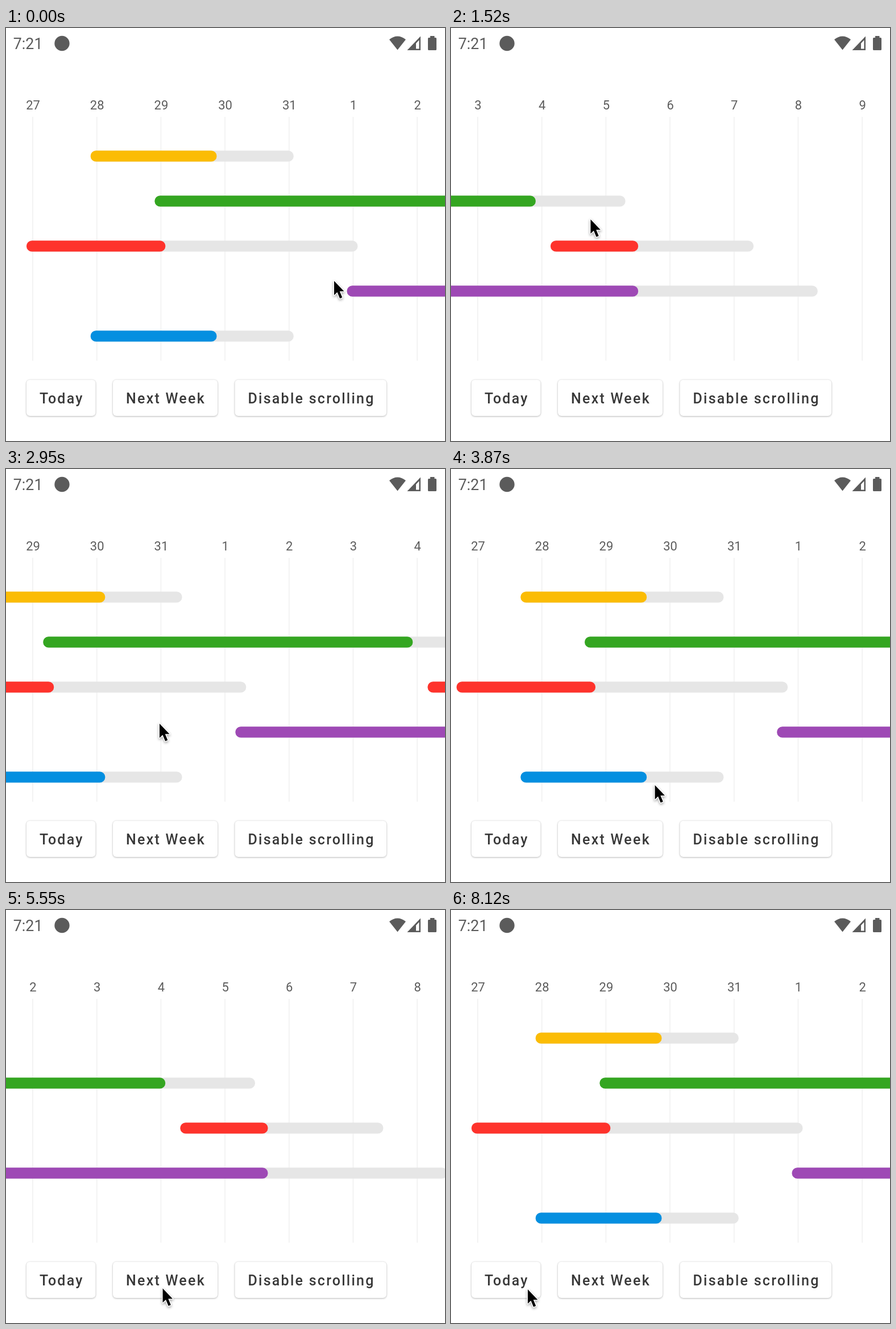
Recreate the animation shown at these times as an HTML page. Size 772 by 725 pixels, loop 8170 ms.

```html
<!DOCTYPE html>
<html lang="en">
<head>
<meta charset="utf-8">
<title>Scrolling timeline</title>
<style>
html, body { margin: 0; width: 100%; height: 100%; overflow: hidden; background: #fff; }
svg { display: block; width: 772px; height: 725px; font-family: Roboto, sans-serif; }
#days text { font-size: 22px; fill: #5c5c5c; text-anchor: middle; }
#buttons text { font-size: 25px; font-weight: 500; letter-spacing: .0893em; fill: #393939; }
#buttons rect { fill: #fff; }
#status { fill: #5b5b5b; }
#cursor { stroke: #fff; stroke-width: 3; paint-order: stroke; stroke-linejoin: round;
  filter: drop-shadow(0 2px 2px rgba(0,0,0,.35)); }
</style>
</head>
<body>
<svg viewBox="0 0 772 725">
  <g id="status">
    <text x="12.8" y="37" font-size="26.8">7:21</text>
    <circle cx="98.5" cy="27" r="13.2"/>
    <path d="M688.5 38.5L674 20.3Q688.5 8.5 703 20.3Z"/>
    <path fill-rule="evenodd" d="M705.5 39L729 14.5V39ZM721 27V36.5H726.5V21.2Z"/>
    <path d="M746 14h7.5v3h2q1.5 0 1.5 1.5v19q0 1.5-1.5 1.5h-12q-1.5 0-1.5-1.5v-19q0-1.5 1.5-1.5h2.5z"/>
  </g>
  <g id="days"></g>
  <g id="bars"></g>
  <g id="buttons"></g>
  <path id="cursor" d="M0 0V25l5.5-5.3 4.6 11 4.2-1.8-4.5-10.7h7.7z"/>
</svg>
<script>
const LOOP = 8170, DAY = 112.7;
const $ = id => document.getElementById(id);

function add(parent, tag, attrs, text = '') {
  const el = document.createElementNS('http://www.w3.org/2000/svg', tag);
  for (const k in attrs) el.setAttribute(k, attrs[k]);
  el.textContent = text;
  return parent.appendChild(el);
}

// 0 to 1 over the given span, smooth at both ends
function ease(t, start, length) {
  const u = Math.min(1, Math.max(0, (t - start) / length));
  return u * u * (3 - 2 * u);
}

// Scroll gestures: start, duration, distance
const swipes = [
  [300, 500, 469], [1050, 550, 311], [1963, 400, -270], [2574, 500, -370], [3550, 450, -142],
  [5230, 450, 791], [6483, 260, -789]
];
const scrollAt = t => swipes.reduce((sum, [start, length, by]) => sum + by * ease(t, start, length), 0);

// Cursor stops: time, x, y
const stops = [
  [0, 577, 444], [300, 700, 615], [700, 400, 410], [920, 481, 399], [1100, 600, 420],
  [1600, 220, 330], [1963, 160, 300], [2363, 400, 323], [2600, 180, 430], [2800, 360, 440],
  [2950, 270, 447], [3500, 200, 480], [4000, 390, 570], [4450, 307, 664], [5450, 307, 664],
  [5820, 135, 666]
];
function cursorAt(t) {
  let [, x, y] = stops[0];
  for (let i = 1; i < stops.length; i++) {
    const [from, x0, y0] = stops[i - 1], [to, x1, y1] = stops[i];
    const p = ease(t, from, to - from);
    x += (x1 - x0) * p;
    y += (y1 - y0) * p;
  }
  return `${x} ${y}`;
}

const labels = [];
for (let i = 0; i < 7; i++) {
  const x = 47 + i * DAY;
  add($('days'), 'path', { d: `M${x} 156V584`, stroke: '#f3f3f3', 'stroke-width': 2 });
  labels.push(add($('days'), 'text', { x: x + .5, y: 143.3 }));
}

// row, start day, length in days, progress, colour
const bars = [
  [0, 1, 3, .6, '#fbbc05'],
  [1, 2, 7, .8, '#34a621'],
  [2, 0, 5, .4, '#fe332c'],
  [2, 8, 3, .4, '#fe332c'],
  [3, 5, 7, .6, '#9e49b5'],
  [4, 1, 3, .6, '#048fe0']
];
for (const [row, start, days, done, color] of bars) {
  const box = { x: 36 + start * DAY, y: 215.2 + row * 79, height: 19.3, rx: 9.6 };
  add($('bars'), 'rect', { ...box, width: days * DAY + 19, fill: '#e6e6e6' });
  add($('bars'), 'rect', { ...box, width: days * DAY * done + 19, fill: color });
}

// label, left edge, width, press time
const buttons = [
  ['Today', 36, 121.5, 6430],
  ['Next Week', 188, 184, 5060],
  ['Disable scrolling', 402.5, 266.5, Infinity]
].map(([label, x, width, press]) => {
  const el = add($('buttons'), 'rect', { x, y: 617.5, width, height: 63.5, rx: 6 });
  add($('buttons'), 'text', { x: x + 23, y: 659 }, label);
  return { el, press };
});

function draw(t) {
  const scroll = scrollAt(t), first = Math.floor(scroll / DAY + .7);
  $('bars').setAttribute('transform', `translate(${-scroll} 0)`);
  labels.forEach((el, i) => el.textContent = (26 + first + i) % 31 + 1);
  for (const { el, press } of buttons) {
    const lift = ease(t, press, 80) - ease(t, press + 170, 150);
    el.style.filter = 'drop-shadow(0 0 1px rgba(0,0,0,.12)) '
      + `drop-shadow(0 ${1.5 + 4.5 * lift}px ${1.5 + 5 * lift}px rgba(0,0,0,.24))`;
  }
  $('cursor').setAttribute('transform', `translate(${cursorAt(t)})`);
}

const began = performance.now();
function tick() {
  draw((performance.now() - began) % LOOP);
  requestAnimationFrame(tick);
}
tick();
</script>
</body>
</html>
```
